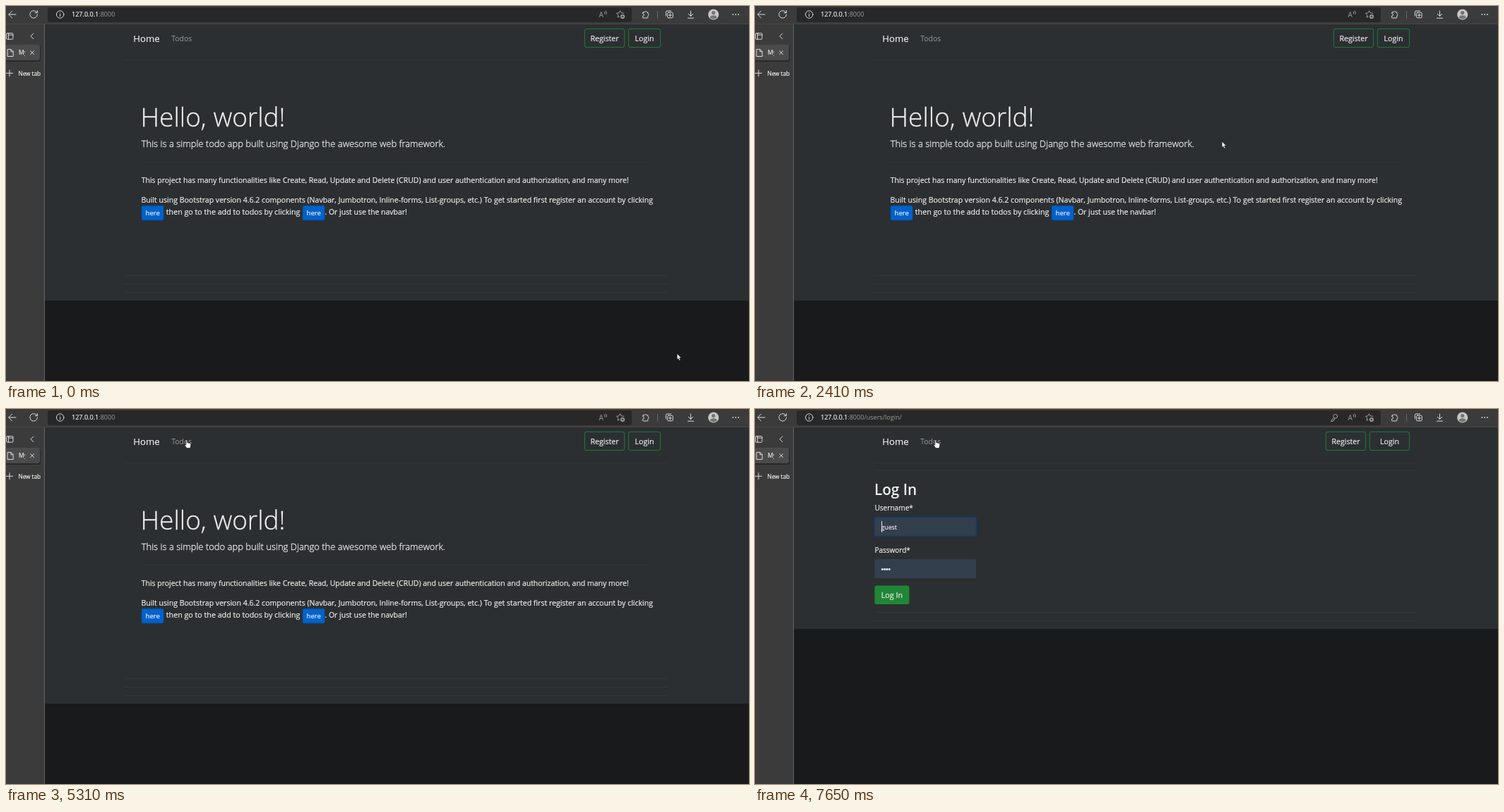
These frames come from a looping animation (1052x532 px, 8 s). An HTML page:

```html
<!DOCTYPE html>
<html lang="en">
<head>
<meta charset="utf-8">
<title>Todo app</title>
<style>
html, body { margin: 0; width: 100%; height: 100%; overflow: hidden; background: #181a1b; }
svg { display: block; width: 1052px; height: 532px; }
text { font-family: "Open Sans", "Noto Sans", sans-serif; fill: #f3f1ee; stroke: #f3f1ee; stroke-width: .18; white-space: pre; }
.icon { fill: none; stroke: #dcdcdc; stroke-width: 1; stroke-linecap: round; stroke-linejoin: round; }
.icon.dim { stroke: #a2a2a2; }
.mid { text-anchor: middle; }
.light { font-weight: 300; stroke-width: .28; }
.grey { fill: #9a9a98; stroke: none; }
.plain { stroke: none; }
.rule { stroke: #313638; stroke-width: 1; }
.outline { fill: none; stroke: #218a3a; stroke-width: .85; }
.link { fill: #0062cc; stroke: #0056b3; stroke-width: .7; }
.field { fill: #343f4e; }
</style>
</head>
<body>
<svg id="stage" viewBox="0 0 1052 532" xmlns="http://www.w3.org/2000/svg"></svg>
<script>
const LOOP = 8000;
const stage = document.getElementById('stage');

const text = (x, y, size, str, attrs = '') =>
  `<text x="${x}" y="${y}" font-size="${size}" ${attrs}>${str}</text>`;
const rect = (x, y, w, h, attrs = '') =>
  `<rect x="${x}" y="${y}" width="${w}" height="${h}" ${attrs}/>`;
const icon = (d, style = '') => `<path class="icon ${style}" d="${d}"/>`;
const rule = (y, x1 = 168, x2 = 936) =>
  `<path class="rule" d="M${x1} ${y + .5}H${x2}"/>`;
const group = (id, body) => `<g id="${id}">${body}</g>`;
const outlineButton = (x, w, label) =>
  rect(x + .4, 32.4, w - .8, 26.2, 'rx="2.7" class="outline"') +
  text(x + w / 2, 50, 10.6, label, 'class="mid"');
const linkButton = (x, id) =>
  rect(x + .2, 283.4, 30.8, 20.4, `rx="2" class="link" id="${id}"`) +
  text(x + 15.7, 297, 9.5, 'here', 'class="mid"');

const toolbar =
  rect(0, 0, 1052, 26, 'fill="#3b3b3b"') +
  rect(59, 2, 827, 21, 'rx="3" fill="#282828"') +
  icon('M14 12H4M8.5 7.2L3.7 12l4.8 4.8') +
  group('reload', icon('M44 9.6A5.3 5.3 0 1 0 44.5 12M44.4 6.5V9.7H41.2')) +
  group('stop', icon('M35.2 8L43.4 16.2M43.4 8L35.2 16.2')) +
  '<circle class="icon" cx="76.7" cy="12" r="5.2"/>' +
  icon('M76.7 11.5V14.6M76.7 9.3V9.4') +
  text(93, 15.3, 9.05, '127.0.0.1<tspan class="grey">:8000<tspan id="path"></tspan></tspan>') +
  group('key',
    '<circle class="icon dim" cx="821.7" cy="10.3" r="2.9"/>' +
    icon('M819.6 12.4L815.8 16.2V17.5H818V16H819.5L821 13.2', 'dim')) +
  text(839.6, 16, 10, 'A', 'class="grey"') +
  icon('M847.3 8.2Q848.4 9.5 847.5 11M849.3 7Q851.4 9.3 849.8 11.6', 'dim') +
  icon('M868.3 15.1L866.2 16.2L866.8 12.6L864.4 10.3L867.9 9.8L869.6 6.7L871.3 9.8L874.8 10.3', 'dim') +
  '<circle cx="873" cy="15" r="3.1" fill="#a2a2a2"/>' +
  '<path d="M873 13.3V16.7M871.3 15H874.7" stroke="#282828" stroke-width=".9"/>' +
  icon('M902.4 8.8H903.8A1.8 1.8 0 0 1 907.2 8.8H908.8V10.6A1.8 1.8 0 0 1 908.8 14V16.2Q908.8 17 908 17H902.4Q901.6 17 901.6 16.2V14.2A1.8 1.8 0 0 0 901.6 10.6V9.6Q901.6 8.8 902.4 8.8Z') +
  '<path d="M922.5 7V18" stroke="#686868"/>' +
  rect(936.6, 9.2, 7.6, 7.6, 'rx="1.4" class="icon"') +
  icon('M934.4 14V8.5Q934.4 7 936 7H941.5M940.4 11V15M938.4 13H942.4') +
  icon('M969.5 7V14.2M966.2 11.2L969.5 14.5L972.8 11.2M965.5 17.2H973.5') +
  '<circle cx="1001.7" cy="12" r="7.6" fill="#c9c7c5"/>' +
  '<circle cx="1001.7" cy="9.6" r="2.6" fill="#767472"/>' +
  '<path d="M996.8 16.6Q997 13.3 1001.7 13.3T1006.6 16.6A7 7 0 0 1 996.8 16.6Z" fill="#767472"/>' +
  [1029.4, 1033.2, 1037].map(x => `<circle cx="${x}" cy="12" r=".9" fill="#dcdcdc"/>`).join('');

const sidebar =
  rect(0, 25, 54, 507, 'fill="#3b3b3b"') +
  rect(54, 26, 1, 506, 'fill="#666"') +
  rect(0, 25, 1052, 1, 'fill="#484848"') +
  rect(.8, 38.6, 9.2, 8.6, 'rx="1.3" class="icon"') +
  icon('M3.6 38.6V47.2M3.6 41H10') +
  icon('M38.8 39L35 42.8L38.8 46.6') +
  rect(-4, 56, 53, 23, 'rx="3" fill="#292929"') +
  rect(-4, 55, 52, 22, 'rx="3" fill="#4b4b4b"') +
  group('doc', icon('M2.5 61.5H7L10.2 64.7V71.5H2.5ZM7 61.5V64.7H10.2')) +
  '<circle id="spinner" cx="6" cy="66.5" r="4.5" fill="none" stroke="#5fb0f0" stroke-width="1.6" stroke-dasharray="2 5.1 2 19.2"/>' +
  `<g clip-path="url(#tabClip)">${text(18, 69.3, 8.5, 'My')}</g>` +
  icon('M34.6 63.7L39.6 68.7M39.6 63.7L34.6 68.7') +
  icon('M.5 95.3H9.5M5 90.8V99.8') +
  text(17.5, 98.6, 8.2, 'New tab');

const home =
  rect(55, 26, 997, 392, 'fill="#2b2f31"') +
  rule(76) + outlineButton(819, 57, 'Register') + outlineButton(881, 46, 'Login') +
  text(190.5, 171.2, 37, 'Hello, world!', 'class="light"') +
  text(191.7, 200, 13, 'This is a simple todo app built using Django the awesome web framework.', 'class="light"') +
  rule(221, 192, 912) +
  text(191.7, 251, 10.47, 'This project has many functionalities like Create, Read, Update and Delete (CRUD) and user authentication and authorization, and many more!') +
  text(191.4, 279, 10.55, 'Built using Bootstrap version 4.6.2 components (Navbar, Jumbotron, Inline-forms, List-groups, etc.) To get started first register an account by clicking') +
  linkButton(192, 'registerLink') +
  text(226.8, 296.4, 10.7, 'then go to the add to todos by clicking') +
  linkButton(420, 'todosLink') +
  text(451.5, 296.4, 10.44, '. Or just use the navbar!') +
  rule(382) + rule(394) + rule(406);

const login =
  rect(55, 26, 997, 286, 'fill="#2b2f31"') +
  rule(76) + rule(87) + outlineButton(808, 57, 'Register') + outlineButton(870, 57, 'Login') +
  text(169, 122, 20.7, 'Log In', 'font-weight="600" class="plain"') +
  text(169.4, 144.3, 10.15, 'Username*') +
  rect(168.2, 152.7, 146, 28.6, 'rx="3.5" fill="#173a68"') +
  rect(169.8, 154.3, 142.8, 25.4, 'rx="2" class="field"') +
  text(178.6, 171.3, 8.7, 'guest') +
  rect(179, 159, 1, 16, 'id="caret" fill="#e8e6e3"') +
  text(169.4, 203.8, 10, 'Password*') +
  rect(169.4, 213, 143.6, 27, 'rx="2.5" class="field"') +
  [0, 1, 2, 3].map(i => `<circle cx="${180.3 + i * 3.3}" cy="227.5" r="1.4" fill="#fff"/>`).join('') +
  rect(169.4, 250.5, 49, 26.5, 'rx="2.7" fill="#208637"') +
  text(193.9, 268, 10.7, 'Log In', 'class="mid"') +
  rule(288) + rule(300);

// Each cursor is drawn around its hot spot.
const cursors =
  group('arrow', '<path d="M.2 .2V8.6L2 6.9L3.3 9.9L4.8 9.2L3.5 6.3H6Z" fill="#fff" stroke="#111" stroke-width=".5"/>') +
  group('beam', '<path d="M-1.8 -5H1.8M0 -5V5M-1.8 5H1.8" fill="none" stroke="#d8d8d8" stroke-width=".8"/>') +
  group('hand', '<path d="M-.9 .7Q0 -.7 .9 .7V4Q2 3.3 2.6 4.3Q3.8 3.7 4.3 4.7Q5.7 4.3 5.9 5.7V8.3Q5.7 10 4.7 11.5H.3Q-1.2 9.5 -2.7 7.5Q-2.7 6 -.9 7.2Z" fill="#fff" stroke="#111" stroke-width=".6"/>');

stage.innerHTML =
  `<defs><clipPath id="tabClip">${rect(17, 58, 9.8, 16)}</clipPath></defs>` +
  rect(0, 0, 1052, 532, 'fill="#181a1b"') +
  group('home', home) + group('login', login) +
  text(180.3, 50.8, 13.15, 'Home') +
  text(234.3, 50, 10.35, 'Todos', 'class="grey"') +
  toolbar + sidebar + group('cursor', cursors);

const el = {};
stage.querySelectorAll('[id]').forEach(node => { el[node.id] = node; });
const show = (id, on) => { el[id].style.display = on ? '' : 'none'; };

// The pointer jumps from point to point; each move has a start, an end and its stops.
const moves = [
  [0, 0, [[950, 493]]],
  [70, 470, [[872, 458], [745, 402], [604, 346], [496, 308], [438, 292, 'hand'], [490, 270], [524, 259]]],
  [1020, 1020, [[525, 259]]],
  [1680, 2070, [[556.5, 249, 'beam'], [581, 236], [606, 224], [630, 212], [650, 203], [663, 197], [668, 195]]],
  [2410, 2600, [[661, 192], [650, 189], [646, 188]]],
  [4690, 5310, [[622, 177], [558, 150], [456, 112], [345, 76], [256, 58], [208, 48, 'hand'], [198, 46, 'hand'], [228, 45], [255.7, 44, 'hand']]]
];

function pointer(t) {
  const [start, end, stops] = moves.filter(m => m[0] <= t).pop();
  const last = stops.length - 1;
  const i = end > start ? Math.floor((t - start + 4) / (end - start) * last) : last;
  return stops[Math.min(i, last)];
}

function draw(t) {
  const loading = t >= 6070 && t < 6640;
  const onLogin = t >= 6640;
  show('home', !onLogin);
  show('login', onLogin);
  show('key', onLogin);
  show('reload', !loading);
  show('stop', loading);
  show('doc', !loading);
  show('spinner', loading);
  show('caret', t < 7120 || t >= 7650);
  el.path.textContent = t >= 6500 ? '/users/login/' : '';
  const turn = Math.floor((t - 6570) / 71) * 50 + 104;
  el.spinner.setAttribute('transform', `rotate(${turn} 6 66.5)`);

  const [x, y, shape = 'arrow'] = pointer(t);
  el.cursor.setAttribute('transform', `translate(${x} ${y})`);
  for (const name of ['arrow', 'beam', 'hand']) show(name, name === shape);
  const hover = x >= 420 && x <= 451 && y >= 283 && y <= 304;
  el.todosLink.style.fill = hover ? '#0054ae' : '';
}

const begin = performance.now();
function tick() {
  draw((performance.now() - begin) % LOOP);
  requestAnimationFrame(tick);
}
tick();
</script>
</body>
</html>
```
